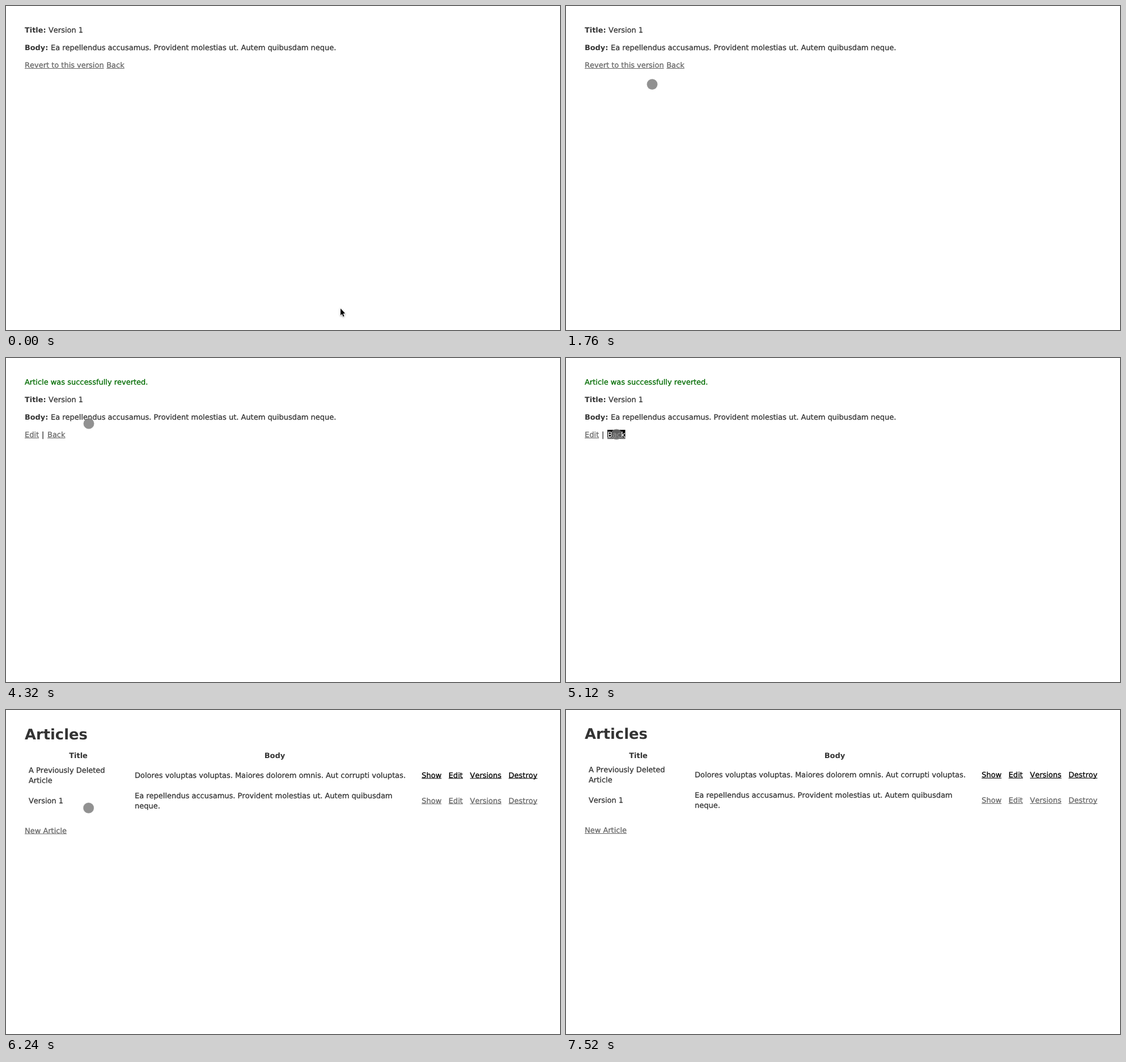
These frames come from a looping animation (977 by 573 pixels, 8.48 s). An HTML page with a canvas:

```html
<!DOCTYPE html>
<html lang="en">
<head>
<meta charset="utf-8">
<title>Article versions</title>
<style>
  html, body { margin: 0; width: 100%; height: 100%; overflow: hidden; background: #fff; }
  canvas { display: block; }
</style>
</head>
<body>
<canvas id="stage" width="977" height="573"></canvas>
<script>
const ctx = document.getElementById('stage').getContext('2d');
const LOOP = 8480, STEP = 160;
const FAMILY = '"DejaVu Sans", Verdana, sans-serif';
const SIZE = 12.97, LINE = 18, PARAGRAPH = 31, LEFT = 33;
const INK = '#333', VISITED = '#666';
const BODY = 'Ea repellendus accusamus. Provident molestias ut. Autem quibusdam neque.';

// Pointer moves: each eases from the last place to (x, y)
const HOME = { x: 590, y: 535 };
const MOVES = [
  { from: 0, to: 800, x: 486, y: 441 },
  { from: 960, to: 1760, x: 152, y: 138.5 },
  { from: 1760, to: 2240, x: 141, y: 108 },
  { from: 4160, to: 4320, x: 146, y: 116 },
  { from: 4320, to: 5120, x: 89, y: 135 },
  { from: 5280, to: 5760, x: 135, y: 159.5 },
  { from: 6080, to: 6560, x: 176, y: 212.5 }
];

// eased 0 to 1 between two times
function ramp(t, from, to) {
  const p = Math.min(1, Math.max(0, (t - from) / (to - from)));
  return p * p * (3 - 2 * p);
}

function pointer(t) {
  let { x, y } = HOME;
  for (const m of MOVES) {
    const p = ramp(t, m.from, m.to);
    x += (m.x - x) * p;
    y += (m.y - y) * p;
  }
  return { x, y };
}

function setFont(weight = 400, size = SIZE) {
  ctx.font = `${weight} ${size}px ${FAMILY}`;
}

function text(s, x, y, color = INK) {
  setFont();
  ctx.fillStyle = ctx.strokeStyle = color;
  ctx.lineWidth = 0.3;
  ctx.fillText(s, x, y);
  ctx.strokeText(s, x, y);
}

function bold(s, x, y, size = 12.85, align = 'left') {
  setFont(700, size);
  ctx.fillStyle = INK;
  ctx.textAlign = align;
  ctx.fillText(s, x, y);
  ctx.textAlign = 'left';
}

// draws a link, inverted under the pointer, and returns its right edge
function link(s, x, y, mouse, color = VISITED) {
  setFont();
  const w = ctx.measureText(s).width;
  const top = y - 13;
  if (mouse.x >= x && mouse.x <= x + w && mouse.y >= top && mouse.y <= top + 16) {
    ctx.fillStyle = '#000';
    ctx.fillRect(x, top, w, 16);
    color = '#fff';
  }
  text(s, x, y, color);
  ctx.fillRect(x, y + 1, w, 1);
  return x + w;
}

function article(y) {
  bold('Title:', LEFT, y);
  text('Version 1', 75, y);
  bold('Body:', LEFT, y + PARAGRAPH);
  text(BODY, 79, y + PARAGRAPH);
  return y + 2 * PARAGRAPH;
}

function versionPage(mouse) {
  const y = article(47);
  const end = link('Revert to this version', LEFT, y, mouse);
  link('Back', end + 4.6, y, mouse);
}

function revertedPage(mouse) {
  text('Article was successfully reverted.', LEFT, 47, '#006b00');
  const y = article(47 + PARAGRAPH);
  link('Edit', LEFT, y, mouse);
  text('|', 63, y);
  link('Back', 73, y, mouse);
}

function row(y, title, body, mouse, color) {
  const cell = (lines, x) => lines.forEach((s, i) =>
    text(s, x, y + (i - (lines.length - 1) / 2) * LINE));
  cell(title, 40);
  cell(body, 227);
  let x = 733;
  for (const s of ['Show', 'Edit', 'Versions', 'Destroy']) {
    x = link(s, x, y, mouse, color) + 12.6;
  }
}

function listPage(mouse) {
  bold('Articles', LEFT, 51, 25.8);
  bold('Title', 127.5, 84.5, SIZE, 'center');
  bold('Body', 474, 84.5, SIZE, 'center');
  row(119, ['A Previously Deleted', 'Article'],
    ['Dolores voluptas voluptas. Maiores dolorem omnis. Aut corrupti voluptas.'], mouse, '#000');
  const split = BODY.lastIndexOf(' ');
  row(164, ['Version 1'], [BODY.slice(0, split), BODY.slice(split + 1)], mouse, VISITED);
  link('New Article', LEFT, 217, mouse);
}

function arrow({ x, y }) {
  ctx.save();
  ctx.translate(x, y);
  ctx.beginPath();
  [[0, 0], [0, 12], [2.7, 9.6], [4.5, 14.2], [6.4, 13.4], [4.5, 8.9], [8, 8.6]]
    .forEach(([px, py]) => ctx.lineTo(px, py));
  ctx.closePath();
  ctx.shadowColor = 'rgba(0,0,0,.4)';
  ctx.shadowBlur = 3;
  ctx.shadowOffsetY = 1;
  ctx.strokeStyle = '#fff';
  ctx.lineWidth = 1.4;
  ctx.stroke();
  ctx.shadowColor = 'transparent';
  ctx.fillStyle = '#000';
  ctx.fill();
  ctx.restore();
}

function dot({ x, y }, alpha) {
  ctx.globalAlpha = alpha;
  ctx.beginPath();
  ctx.arc(x, y, 9.5, 0, Math.PI * 2);
  ctx.fillStyle = 'rgba(118,118,118,.8)';
  ctx.fill();
  ctx.strokeStyle = 'rgba(255,255,255,.2)';
  ctx.lineWidth = 1;
  ctx.stroke();
  ctx.globalAlpha = 1;
}

function draw(now) {
  // the picture advances in fixed steps
  const t = Math.floor((now % LOOP) / STEP) * STEP;
  const mouse = pointer(t);
  const page = t < 3680 ? versionPage : t < 5440 ? revertedPage : listPage;
  const bounce = ramp(t, 6080, 6400) - ramp(t, 7040, 7520);

  ctx.fillStyle = '#fff';
  ctx.fillRect(0, 0, 977, 573);
  ctx.fontKerning = 'none';
  ctx.textRendering = 'geometricPrecision';
  ctx.save();
  ctx.translate(0, bounce);
  page(mouse);
  ctx.restore();

  if (t < STEP) arrow(mouse);
  else dot(mouse, 1 - ramp(t, 6560, 7200));
}

const start = performance.now();
function tick() {
  draw(performance.now() - start);
  requestAnimationFrame(tick);
}
tick();
</script>
</body>
</html>
```
